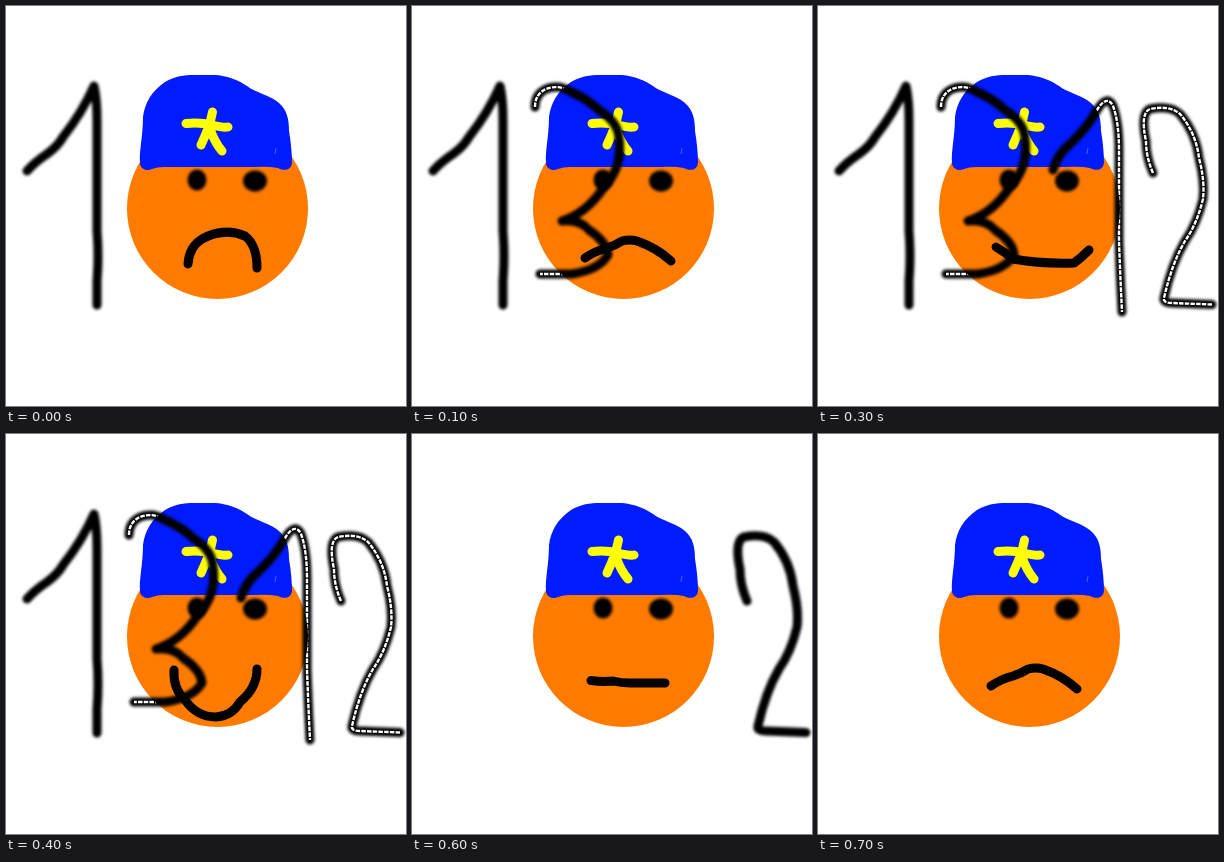
An HTML page for the animation above (800 ms loop, 400 px wide and 400 px high).

```html
<!DOCTYPE html>
<html>
<head>
<meta charset="utf-8">
<style>
html, body { margin: 0; width: 100%; height: 100%; overflow: hidden; background: #fff; }
svg { display: block; width: 100vw; height: 100vh; }
.pen { fill: none; stroke: #000; stroke-width: 9; stroke-linecap: round; stroke-linejoin: round; }
.dots { fill: none; stroke: #fff; stroke-width: 2.4; stroke-dasharray: 4.5 1.2; }
</style>
</head>
<body>
<svg viewBox="0 0 400 400">
  <defs>
    <filter id="soft" filterUnits="userSpaceOnUse" x="0" y="0" width="400" height="400" color-interpolation-filters="sRGB">
      <feGaussianBlur stdDeviation="1.7"/>
    </filter>
    <circle id="face" cx="211.5" cy="202.5" r="90.5"/>
    <path id="cap" d="M134 157 C133 145 137 130 137 111 C139 96 146 85 159 76 C169 70 178 69 188 69 H210 C222 70 234 75 241 80 C250 87 264 89 273 97 C281 104 283 113 283 125 C285 137 286 148 286 157 C285 165 277 165 272 162 Q262 160 248 161 H158 Q151 161 146 163 C140 166 134 162 134 157Z"/>
    <mask id="outside" maskUnits="userSpaceOnUse" x="0" y="0" width="400" height="400">
      <rect width="400" height="400" fill="#fff"/>
      <use href="#face"/><use href="#cap"/>
    </mask>
  </defs>
  <use href="#face" fill="#ff7b00"/>
  <use href="#cap" fill="#001bff"/>
  <path d="M270 142 L269 148" stroke="#4a62ff" fill="none"/>
  <path class="pen" style="stroke:#ff0" d="M180 117.500 Q194 116 206 119 T222 121 M206.500 106 Q204 120 195 139 M204 123 Q209 137 216 145"/>
  <g filter="url(#soft)">
    <ellipse cx="191" cy="174" rx="9.500" ry="10.500"/>
    <ellipse cx="249" cy="175" rx="12" ry="10.500"/>
  </g>
  <path class="pen" id="mouth"/>
  <g class="pen" id="digits" filter="url(#soft)"></g>
  <g class="dots" id="trim" mask="url(#outside)"></g>
</svg>
<script>
const FROWN = "M182 258 Q183 241 196 233 Q218 221 239 230 Q251 239 251 262";
const SAD = "M173 252 Q183 245 195 242 Q204 239 210 235 Q218 233 225 235 Q245 242 259 255";
const FLAT = "M179 246.500 Q190 248 201 247 Q209 249 218 249 H253";
const GRIN = "M168 236 Q167 255 179 266 Q191 283 210 283 Q226 282 234 268 Q251 254 251 235";
const SMILE = "M178 241 Q188 247 195 253 Q222 258 256 257 Q263 252 271 244";
const mouths = [FROWN, SAD, FLAT, SMILE, GRIN, SMILE, FLAT, SAD];

// stroke, first step, last step
const digits = [
  ["M21 165 Q29 156 41 148 Q52 140 57 131 Q76 107 88 80 Q91 93 91 115 V225 Q93 250 91 275 V299", 0, 4],
  ["M123 101 Q123 88 134 83 Q147 78 159 86 Q174 92 187 104 Q206 116 207 132 Q211 161 192 181 Q175 207 150 215 Q168 213 177 224 Q195 236 196 249 Q187 264 160 268 H128", 1, 4],
  ["M235 164 Q239 149 252 138 Q270 121 279 104 Q289 88 295 100 Q301 116 301 145 V235 Q302 265 304 306", 2, 5],
  ["M335 167 Q328 151 328 135 Q322 107 332 103 Q352 99 362 108 Q378 127 381 152 Q387 175 385 193 Q379 218 367 235 Q354 257 346 292 Q345 297 354 297 L394 298.500", 3, 6]
];

const el = id => document.getElementById(id);
const join = list => list.map(([d]) => `<path d="${d}"/>`).join("");
let last = -1;

function draw(now) {
  const step = Math.floor(now % 800 / 100);
  if (step !== last) {
    last = step;
    const shown = digits.filter(([, from, to]) => step >= from && step <= to);
    el("mouth").setAttribute("d", mouths[step]);
    el("digits").innerHTML = join(shown);
    el("trim").innerHTML = step < 5 ? join(shown.slice(1)) : "";
  }
  requestAnimationFrame(draw);
}
draw(0);
</script>
</body>
</html>
```
